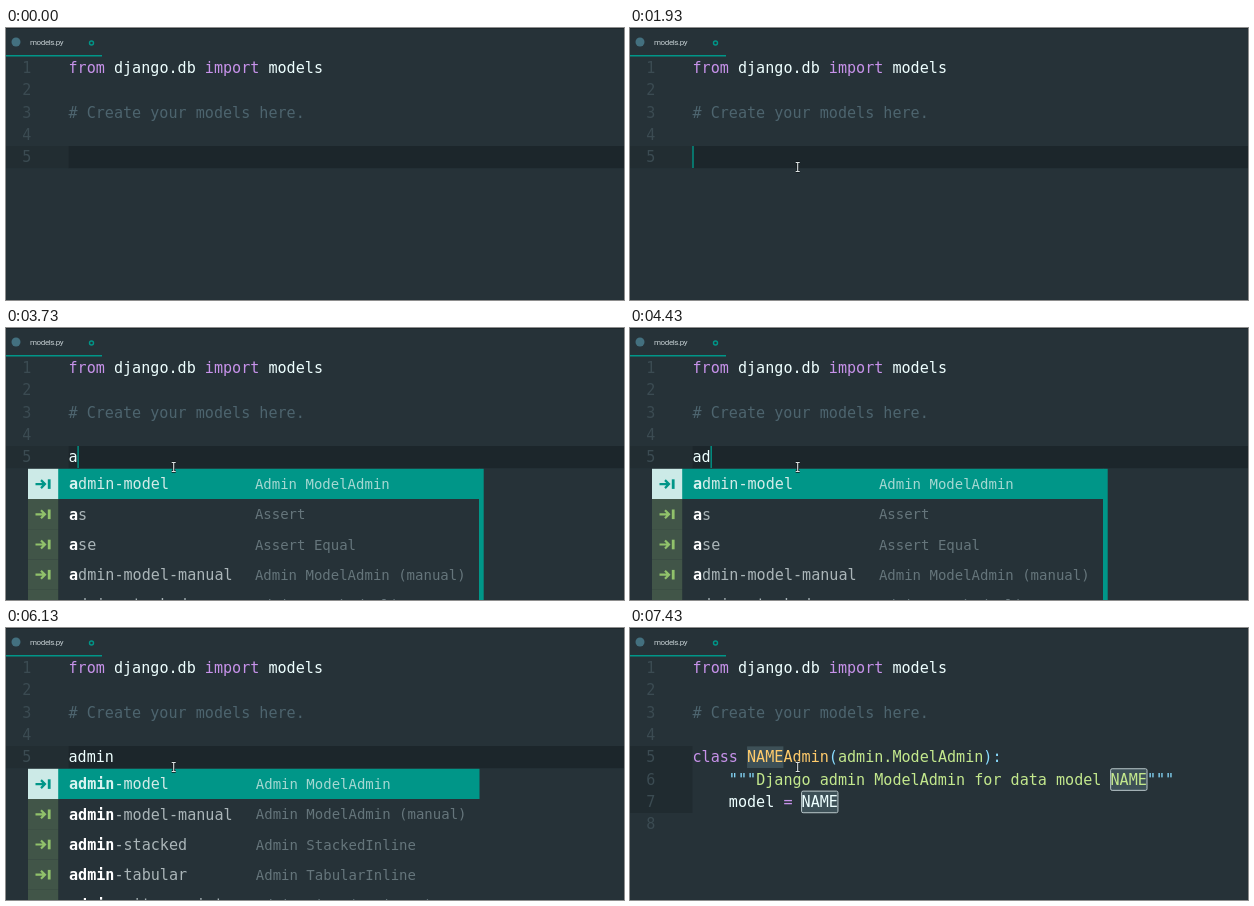
An HTML page that plays this animation: 618 px wide and 272 px high, repeating every 8000 ms.

```html
<!DOCTYPE html>
<html lang="en">
<head>
<meta charset="utf-8">
<title>Snippet completion</title>
<style>
html, body { margin: 0; width: 100%; height: 100%; overflow: hidden; background: #263238; }
svg { display: block; }
text { white-space: pre; font: 15.1px "DejaVu Sans Mono", monospace; }
.tab { font: 8px Roboto, sans-serif; letter-spacing: -.4px; }
.info { font-size: 14px; }
.bold { font-weight: bold; fill: #fff; }
</style>
</head>
<body>
<svg id="stage" width="618" height="272" viewBox="0 0 618 272"></svg>
<script>
const LOOP = 8000, LEFT = 62.5, CHAR = 9.09, LINE = 22.37, TOP = 28.5;
const WHITE = '#eeffff', PURPLE = '#c792ea', CYAN = '#89ddff', GREEN = '#c3e88d',
      YELLOW = '#ffcb6b', TEAL = '#009688', MUTED = '#4d646e';
const stage = document.getElementById('stage');

const rect = (x, y, w, h, fill, more = '') =>
  `<rect x="${x}" y="${y}" width="${w}" height="${h}" fill="${fill}" ${more}/>`;
const text = (x, y, body, fill, cls = '') =>
  `<text x="${x}" y="${y}" fill="${fill}" class="${cls}">${body}</text>`;
const colX = col => LEFT + col * CHAR;
const lineY = n => TOP + (n - 1) * LINE;

// parts: string, colour, string, colour, ...
function code(n, col, ...parts) {
  let body = '';
  for (let i = 0; i < parts.length; i += 2)
    body += `<tspan fill="${parts[i + 1]}">${parts[i]}</tspan>`;
  return text(colX(col), lineY(n) + 16.4, body, WHITE);
}
const caret = (n, col) => rect(colX(col) - .2, n === 5 ? 118 : lineY(n), 1.4, 22, TEAL);

function frameParts(lines) {
  let s = rect(0, 0, 618, 1, '#1c262b') + rect(0, 27, 96, 1.5, TEAL) +
    '<circle cx="10" cy="14" r="4.5" fill="#43707f"/>' +
    text(24, 17, 'models.py', '#c3cdd0', 'tab') +
    `<circle cx="85.5" cy="15" r="2" fill="none" stroke="${TEAL}" stroke-width="1.4"/>`;
  for (let n = 1; n <= lines; n++) s += text(16.3, lineY(n) + 16.4, n, '#3b4b52');
  return s + code(1, 0, 'from', PURPLE, ' django.db ', WHITE, 'import', PURPLE, ' models', WHITE) +
    code(3, 0, '# Create your models here.', MUTED);
}

const broad = [['admin-model', 'Admin ModelAdmin'], ['as', 'Assert'], ['ase', 'Assert Equal'],
  ['admin-model-manual', 'Admin ModelAdmin (manual)'], ['admin-stacked', 'Admin StackedInline']];
const narrow = [broad[0], broad[3], broad[4], ['admin-tabular', 'Admin TabularInline'],
  ['admin-site-register', 'Admin Site (register)']];

function popup(items, bold, bar) {
  let s = rect(22, 140.8, 451.5, 132, '#263238');
  items.forEach(([name, info], i) => {
    const y = 140.8 + i * 30.2, mid = y + 15.3, on = i === 0;
    const ink = on ? TEAL : '#91c26b';
    if (on) s += rect(52, y, 421.5, 30.2, TEAL);
    s += rect(22, y, 30.2, 30.3, on ? '#cceae7' : '#415548') +
      `<path d="M29.5 ${mid}h8M35 ${mid - 4}l4 4l-4 4" fill="none" stroke="${ink}" stroke-width="2.2"/>` +
      rect(41.8, mid - 4.8, 2.8, 9.6, ink) +
      text(63, mid + 5.3, `<tspan class="bold" ${on ? 'style="fill:#d9f3f0"' : ''}>${name.slice(0, bold)}</tspan>${name.slice(bold)}`,
        on ? '#d3ebe8' : '#aab5b8') +
      text(bar ? 248.9 : 249.8, mid + 5, info, on ? '#a5d8d2' : '#65757b', 'info');
  });
  return s + (bar ? rect(473, 140.8, 4.7, 132, TEAL) : '');
}

function snippet(t) {
  const name = (n, col, boxed) => rect(colX(col), lineY(n) + .4, 4 * CHAR, 21.6, '#3d5057',
    boxed ? 'rx="1.5" stroke="#b9c7ca"' : '');
  const boxed = t >= 6830;
  let s = rect(0, 118, LEFT, 67, '#202b30') + name(5, 6, false) + name(6, 46, boxed) + name(7, 12, boxed) +
    frameParts(8) +
    code(5, 0, 'class ', PURPLE, 'NAMEAdmin', YELLOW, '(', CYAN, 'admin.ModelAdmin', GREEN, '):', CYAN) +
    code(6, 4, '"""', CYAN, 'Django admin ModelAdmin for data model NAME', GREEN, '"""', CYAN) +
    code(7, 4, 'model ', WHITE, '=', PURPLE, ' NAME', WHITE);
  if (t < 7330) s += caret(5, 10) + caret(6, 50) + caret(7, 16);
  return s;
}

const passed = (t, times) => times.filter(at => t >= at).length;

function typing(t) {
  const typed = passed(t, [3730, 4430, 4730, 4930, 5330]);
  const bold = passed(t, [3730, 4530, 4730, 5030, 5430]);
  let s = rect(0, 118, LEFT, 22.2, '#222d32') + rect(LEFT, 118, 556, 22.2, '#1c262b') +
    frameParts(5) + code(5, 0, 'admin'.slice(0, typed), WHITE);
  if (typed) s += t < 4530 ? popup(broad, bold, true) : popup(narrow, bold, false);
  const lit = (t >= 1930 && t < 2630) || (t >= 3630 && t < 6130);
  return s + (lit ? caret(5, typed) : '');
}

function pointer(t) {
  if (t < 730) return '';
  const p = Math.min(1, Math.floor((t - 730) / 100) / 6), e = p * p * (3 - 2 * p);
  const x = 7 + 160.7 * e, y = 232 - 94 * e + (t >= 1530 ? 1 : 0);
  const beam = (color, width) => `<path d="M${x - 2} ${y - 4.5}h4M${x} ${y - 4.5}v9M${x - 2} ${y + 4.5}h4"
    fill="none" stroke="${color}" stroke-width="${width}"/>`;
  return beam('#11181b', 2.4) + beam('#dde3e4', 1.1);
}

let shown = '';
function draw(now) {
  const t = now % LOOP;
  const picture = (t < 6730 ? typing(t) : snippet(t)) + pointer(t);
  if (picture !== shown) stage.innerHTML = shown = picture;
  requestAnimationFrame(draw);
}
draw(performance.now());
</script>
</body>
</html>
```
